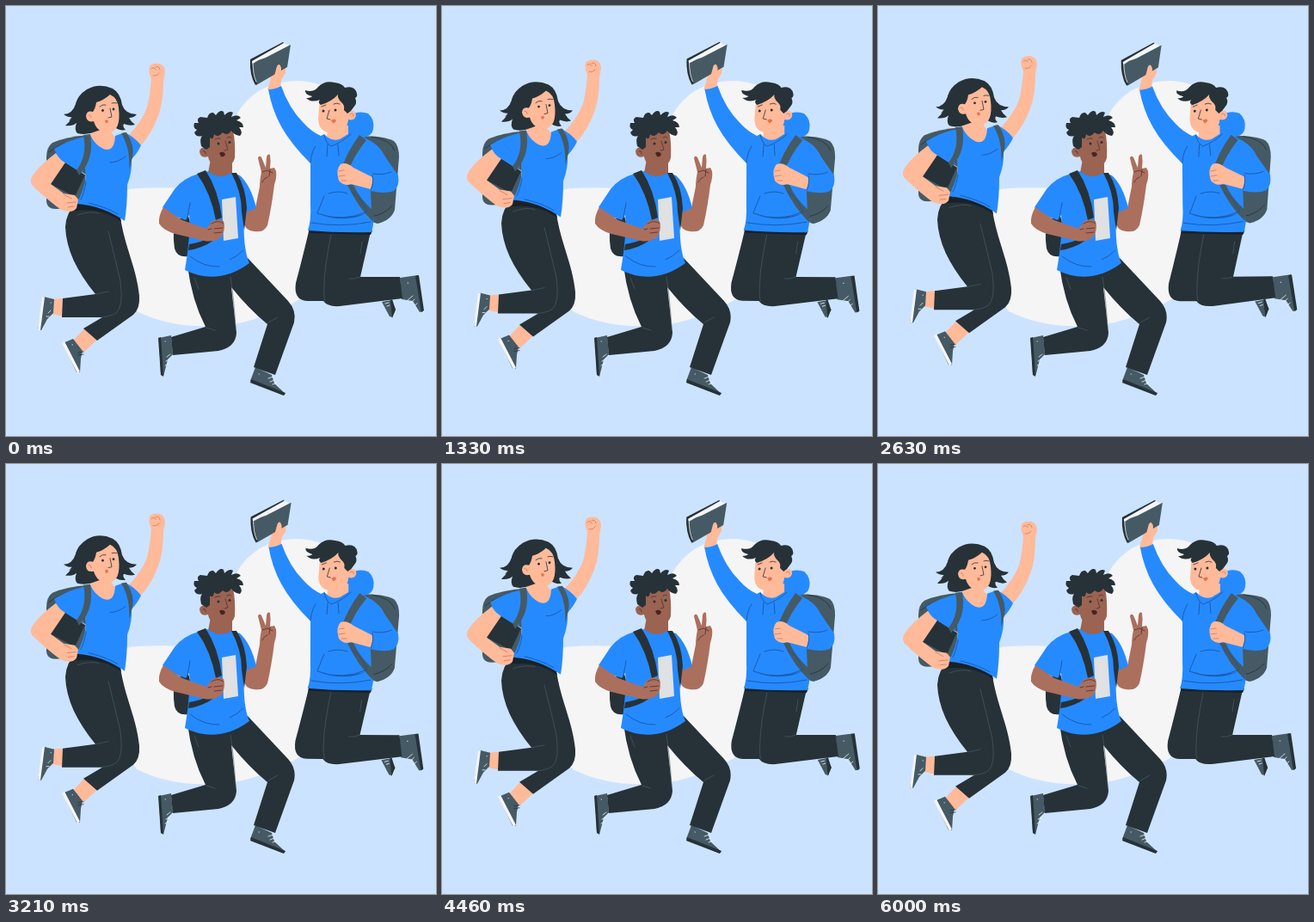
An HTML page for the animation above (6040 ms loop, 500 by 500 pixels).

```html
<!DOCTYPE html>
<html lang="en">
<head>
<meta charset="utf-8">
<title>Jumping students</title>
<style>
html, body { margin: 0; width: 100%; height: 100%; overflow: hidden; background: #cce3ff; }
svg { display: block; width: 100vw; height: 100vh; }
.blue { fill: #268aff; }
.dark { fill: #263238; }
.deep { fill: #182127; }
.gray { fill: #455a64; }
.slate { fill: #37474f; }
.skin { fill: #ffba9a; }
.brown { fill: #9b6352; }
.tawny { fill: #ab6f5e; }
.white { fill: #f5f5f5; }
.lips { fill: #e8734c; }
.line, .fold, .seam, .lace, .crease, .tan { fill: none; stroke-width: .8; stroke-linecap: round; stroke-linejoin: round; }
.line { stroke: #263238; }
.fold { stroke: #17529c; }
.seam { stroke: #50626b; stroke-width: .6; }
.lace { stroke: #f5f5f5; }
.crease { stroke: #d47758; }
.tan { stroke: #55302a; }
</style>
</head>
<body>
<svg viewBox="0 0 500 500">
  <path class="white" d="M138 214Q160 209 232 213Q258 180 267 128Q289 88 338 87Q395 88 407 150Q424 260 368 322Q330 354 275 368Q205 381 152 355Q132 330 130 260Z"/>

  <g id="girl">
    <!-- backpack and raised arm -->
    <path class="gray" d="M96 150Q70 152 54 159Q47 164 47 176V226Q47 236 58 236L90 234Z"/>
    <path class="line" d="M50 170Q66 157 88 156M48 222Q56 228 70 227"/>
    <path class="skin" d="M169 84Q165 77 167 70Q171 66 178 67Q185 69 185 77L183 88Q183 112 177 128Q169 149 157 162L143 150Q158 134 164 118Q168 102 169 84Z"/>
    <path class="crease" d="M169 73Q172 70 174 74M174 71Q178 69 179 74M171 81Q176 82 178 78"/>

    <!-- shoes, ankles, trousers -->
    <path class="skin" d="M53 341L67 340V361L53 358ZM78 389L92 374L107 387L90 403Z"/>
    <path class="gray" d="M44 338L56 341L55 357L48 364L41 377L37 377Z"/>
    <path class="white" d="M42 339L45 338L40 377L37 377Z"/>
    <path class="lace" d="M49 357L52 354M47 361L50 361M52 345h.5"/>
    <path class="gray" d="M78 387L89 401L87 410L86 426L82 426L66 392Z"/>
    <path class="white" d="M65 392L68 390L86 425L83 427Z"/>
    <path class="line" d="M84 403L90 402M84 406L90 405"/>
    <path class="lace" d="M77 394h.5"/>
    <path class="dark" d="M82 230Q70 239 69 257C70 283 82 308 104 335L66 340L65 362L112 362L90 375L106 389L148 359Q156 352 155 337C152 305 138 280 133 246L128 230Z"/>
    <path class="deep" d="M82 228L130 236L134 251Q112 234 79 238Z"/>
    <path class="seam" d="M119 262Q126 290 133 320Q137 350 128 357Q122 361 110 362M83 243Q98 238 108 241M105 335L119 332"/>

    <!-- shirt -->
    <path class="skin" d="M101 137L121 141Q121 149 130 154Q126 172 113 169L97 152Q101 147 101 137Z"/>
    <path class="blue" d="M98 150Q103 161 113 166Q126 171 127 151L138 147Q149 152 157 162Q153 171 146 178Q147 192 141 208Q141 232 138 250Q112 232 82 230Q91 213 93 198L88 154Z"/>
    <path class="gray" d="M134 148L140 147Q150 162 147 176L143 190Q145 166 134 148Z"/>
    <path class="fold" d="M121 182Q130 182 139 175M96 229Q117 234 130 242M93 205Q91 217 87 225"/>

    <!-- head -->
    <path class="dark" d="M124 96Q108 89 94 97Q83 104 81 114Q77 126 67 126Q73 130 77 129Q74 135 69 139Q77 140 82 136Q79 144 83 148Q93 151 104 146L124 139Q131 146 139 144Q135 140 137 137Q144 140 150 138Q145 134 143 130Q149 130 152 126Q139 126 135 115Q133 101 124 96Z"/>
    <path class="skin" d="M105 112Q113 110 121 103Q130 107 131 119Q134 145 120 147Q106 148 102 134Q94 136 93 128Q94 121 101 123Q104 119 105 112Z"/>
    <path class="line" d="M109 117Q112 114 116 115M123 113Q126 112 129 113M121 119L123 129L119 130M82 112Q80 127 74 133M88 111Q88 139 94 145"/>
    <circle class="dark" cx="112.500" cy="121.500" r="1.400"/>
    <circle class="dark" cx="125" cy="120" r="1.400"/>
    <path class="lips" d="M115 133Q118 131 119 134Q118 137 116 136Z"/>
    <path class="crease" d="M96 127Q99 126 99 130"/>

    <!-- book and bent arm -->
    <path class="dark" d="M67 180L92 196L80 222L52 207Z"/>
    <path class="lace" d="M67 180L92 196"/>
    <path class="skin" d="M58 171Q38 186 31 197Q26 205 33 211Q49 226 64 237Q77 242 82 235L84 225L80 220L67 218L52 207L69 182Z"/>
    <path class="crease" d="M67 219L76 224M71 229L81 228M72 234L79 233"/>
    <path class="blue" d="M91 152Q72 156 56 166Q60 177 67 181L89 195L96 160Z"/>
    <path class="gray" d="M90 150L98 149Q102 173 91 189L85 197L82 191Q95 174 90 150Z"/>
  </g>

  <g id="middle">
    <!-- bag, arms -->
    <path class="dark" d="M212 244L198 248Q193 264 196 282Q199 293 212 291L219 270Z"/>
    <path class="tawny" d="M278 235L276 251Q278 261 288 262Q300 264 304 255Q309 233 312 208Q315 199 314 192L312 188L307 189Q308 180 307 173Q304 171 303 176L302 188L297 176Q294 173 293 177L297 193Q295 203 295 210L290 235Z"/>
    <path class="tan" d="M298 193L304 191L310 194M304 199Q299 201 298 205M307 190L306 198"/>

    <!-- legs and shoes -->
    <path class="gray" d="M178 386L192 383L194 405L188 411L183 431L180 429Z"/>
    <path class="dark" d="M177 386L180 385L183 430L180 429Z"/>
    <path class="lace" d="M187 408L191 405M186 413L190 411M185 418L189 416M185 390h.5"/>
    <path class="gray" d="M290 420L309 429L312 439L325 451L321 452L284 436Z"/>
    <path class="dark" d="M285 434L325 450L323 453L284 438Z"/>
    <path class="lace" d="M305 433L311 431M307 437L312 435M310 440L315 438M294 428h.5"/>
    <path class="dark" d="M211 302Q216 342 232 373L192 385L194 406L247 401Q267 397 268 380L262 327Q282 352 304 370L288 420L313 429L335 368Q338 354 328 343L281 293Z"/>
    <path class="seam" d="M261 315Q265 340 267 374M233 374L243 377M305 368L316 362M219 316L224 329"/>

    <!-- shirt -->
    <path class="brown" d="M238 178L263 183V196Q249 207 235 194Z"/>
    <path class="blue" d="M224 195Q206 200 196 213L182 234Q192 244 209 249L213 243Q215 265 208 307Q246 326 283 299Q275 281 277 241L291 235Q285 209 272 197L262 194Q248 203 235 192Z"/>
    <path class="dark" d="M222 195L232 191Q247 214 251 246L244 249Q238 217 222 195ZM262 194L268 194Q279 211 280 235L277 261L274 239Q274 216 262 194ZM212 284Q228 282 242 272L236 270Q226 275 213 277Z"/>
    <path fill="#dfe1e3" d="M251 225L267 222L270 270L253 273Z"/>
    <path class="fold" d="M214 229L211 246M214 291Q230 304 248 303M276 284Q268 292 260 295"/>
    <path class="tawny" d="M183 234Q177 244 178 253Q183 261 197 265L231 273Q240 275 249 270Q256 262 253 250Q246 246 239 251L233 259L205 249Z"/>
    <path class="tan" d="M239 253Q247 248 253 253M242 259L252 258M242 264L251 263M235 260L239 259"/>

    <!-- head -->
    <path class="brown" d="M235 148L264 145Q267 158 266 177Q263 188 251 187Q237 187 235 175Q226 178 225 169Q226 163 234 165Z"/>
    <path class="dark" d="M227 163Q225 154 228 151Q221 153 219 147L222 144Q217 142 219 136L224 136Q221 131 226 129L234 130Q236 123 241 124L244 127Q249 120 253 123L254 127Q260 121 264 124L262 129Q270 125 273 130L268 133Q276 135 276 141L271 141Q276 147 272 151Q265 150 262 145Q257 152 252 147Q246 154 242 149Q241 157 237 153V164L233 167Z"/>
    <path class="tan" d="M243 155Q246 153 249 154M257 153Q260 151 262 153M255 157L258 167L254 168M229 169Q232 167 232 172"/>
    <circle class="dark" cx="247" cy="160" r="1.500"/>
    <circle class="dark" cx="260" cy="158.500" r="1.500"/>
    <path fill="#482522" d="M248 171Q252 168 255 172Q254 176 250 175Z"/>
  </g>

  <g id="boy">
    <!-- backpack and hood -->
    <path class="gray" d="M410 151Q440 151 451 157Q457 162 457 176L452 237Q448 249 432 253Q424 252 414 239L394 208Z"/>
    <path class="line" d="M425 152Q447 155 452 168M424 245Q440 243 449 232"/>
    <path class="blue" d="M399 127Q411 121 421 125Q429 132 427 143Q426 151 415 153L391 158Z"/>

    <!-- raised hand and book -->
    <path class="skin" d="M304 97L308 84L307 77L313 67Q319 66 320 73L325 71L325 78L320 86L319 97Z"/>
    <path class="white" d="M286 64L323 43L329 46L326 69L291 89Z"/>
    <path class="gray" d="M287 67Q294 62 302 60L331 45L327 71L291 92Q285 84 284 64Z"/>
    <path class="dark" d="M284 62L322 42L323 43L286 64Q287 80 292 90L290 92Q283 80 284 62Z"/>
    <path class="lace" d="M287 65Q287 80 291 88"/>
    <path class="skin" d="M311 85L315 70Q318 65 320 72V82Z"/>

    <!-- shoes and trousers -->
    <path class="gray" d="M437 344L448 342L453 353L449 362L446 361Z"/>
    <path class="dark" d="M447 342L449 341L453 353L449 363Z"/>
    <path class="lace" d="M441 346L445 345M443 349L446 348"/>
    <path class="gray" d="M458 316L479 313L485 355L481 356L473 343L460 341Z"/>
    <path class="dark" d="M476 314L480 313L486 354L483 356Z"/>
    <path class="lace" d="M467 342L473 337M471 345L475 341M474 349L478 346M467 322h.7"/>
    <path class="dark" d="M353 258Q346 288 337 322Q334 342 350 343H369Q374 350 388 349L461 340L458 315L412 315L425 258Z"/>
    <path class="seam" d="M378 266Q370 305 370 325Q369 337 371 343M412 315Q405 318 399 317M414 274L412 288"/>
    <path class="deep" d="M352 259L426 261L424 266L352 264Z"/>

    <!-- hoodie -->
    <path class="skin" d="M374 140L398 139V151Q385 166 373 155Z"/>
    <path class="blue" d="M305 97Q313 97 320 93Q329 119 346 136Q355 146 366 151L370 149Q378 158 388 155L401 147L414 152Q434 160 440 174L456 197Q458 209 451 215Q442 219 424 215L425 238Q430 245 425 263Q386 264 351 261Q355 250 354 230L354 183Q331 160 320 140Q309 120 305 97Z"/>
    <path class="gray" d="M411 150L419 156Q404 174 396 197L389 193Q396 170 411 150ZM397 208L404 208Q411 224 428 239L427 251Q409 234 397 208Z"/>
    <path class="fold" d="M370 150Q372 160 378 163Q390 159 401 149M354 182Q355 170 360 163M370 221L362 241Q391 252 420 239Q411 220 402 216M355 252Q389 258 424 251M375 218Q387 214 397 218M374 161L373 175M386 161L387 174M426 195Q439 197 448 193"/>
    <path fill="#195cae" d="M363 242Q391 250 419 241Q395 253 363 242Z"/>
    <path class="skin" d="M404 188Q396 181 389 184Q383 190 387 203Q393 210 401 207L424 213Q427 205 426 199Z"/>
    <path class="crease" d="M387 192L393 191M387 198L394 197M390 203L396 203"/>
    <path class="fold" d="M426 197Q428 206 424 214"/>

    <!-- head -->
    <path class="skin" d="M365 106L393 103L398 123Q406 119 407 127Q406 134 398 132Q396 149 378 147Q364 147 363 132Z"/>
    <path class="dark" d="M366 115Q362 112 365 109Q355 113 349 107Q354 107 356 105Q347 103 348 98Q358 101 363 94Q371 86 382 89Q391 90 394 95Q406 92 408 102Q409 105 406 107Q409 113 404 118L401 122L397 125L393 121Q394 115 390 112Q385 107 386 103Q379 111 366 115Z"/>
    <path class="line" d="M367 117L372 115M381 114Q385 112 388 114M376 121L373 131L377 132"/>
    <circle class="dark" cx="369" cy="122" r="1.500"/>
    <circle class="dark" cx="383" cy="121" r="1.500"/>
    <path class="lips" d="M378 133Q382 130 384 133Q382 137 380 136Z"/>
    <path class="crease" d="M400 126Q404 123 404 128"/>
  </g>
</svg>
<script>
const LOOP = 6040;
const girl = document.getElementById("girl");
const boy = document.getElementById("boy");

// Triangle wave: 0, 1, 0, -1 over one cycle.
const sway = p => 1 - Math.abs(4 * ((p + .25) % 1) - 2);

function draw(now) {
  const p = now % LOOP / LOOP;
  const lift = 10 * (1 - Math.abs(1 - 2 * p));
  girl.setAttribute("transform", `translate(0 ${-lift})`);
  boy.setAttribute("transform", `rotate(${sway(2 * p)} 384 200)`);
}

const start = performance.now();
function tick() {
  draw(performance.now() - start);
  requestAnimationFrame(tick);
}
tick();
</script>
</body>
</html>
```
